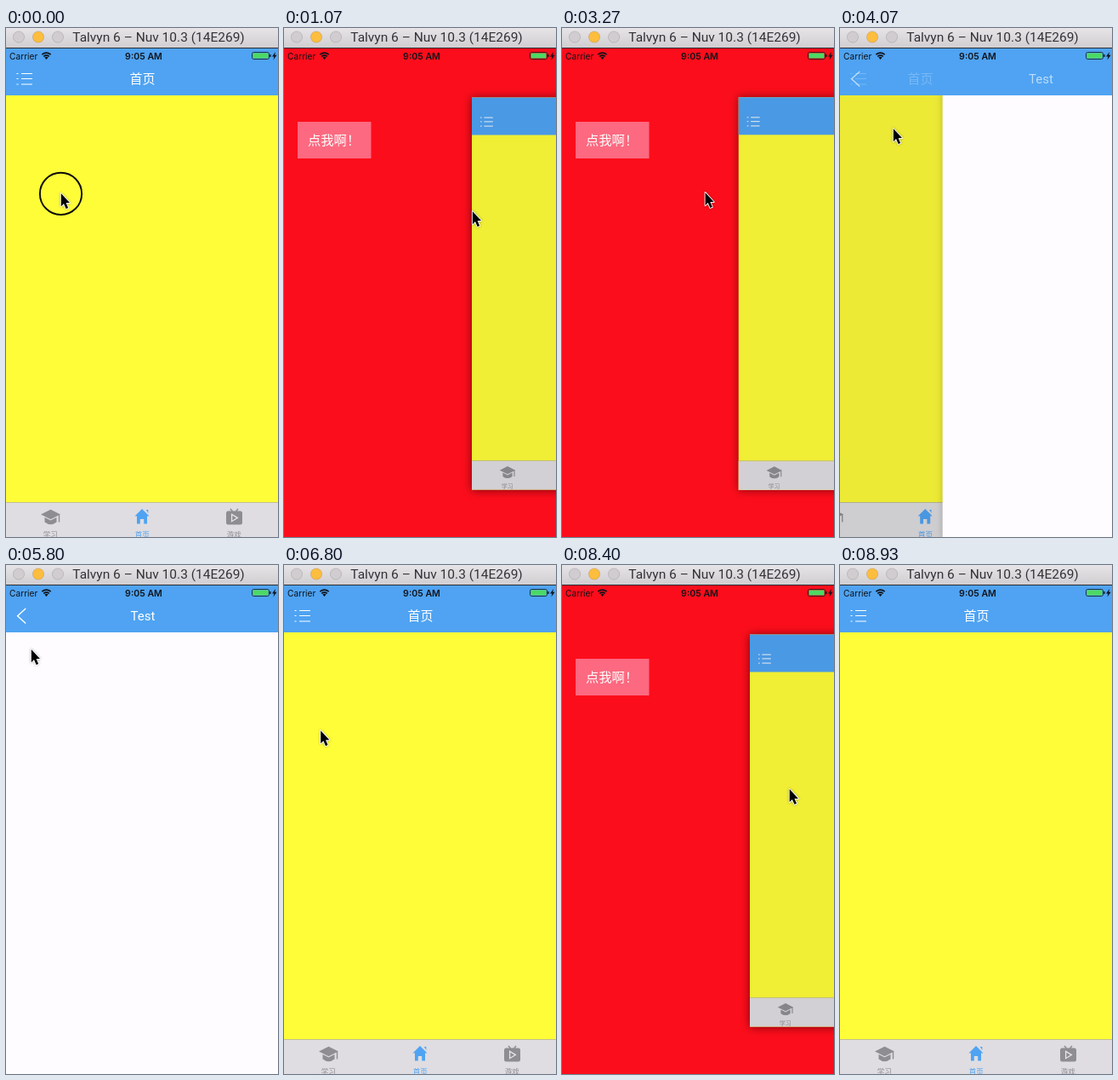
These frames come from a looping animation (320x597 px, 8990 ms). An HTML page with a canvas:

```html
<!DOCTYPE html>
<html lang="zh-CN">
<head>
<meta charset="utf-8">
<title>Side menu demo</title>
<style>
html, body { margin: 0; width: 100%; height: 100%; overflow: hidden; background: #fc0d1b; }
canvas { display: block; width: 320px; height: 597px; }
</style>
</head>
<body>
<canvas id="stage" width="320" height="597"></canvas>
<script>
const ctx = document.getElementById('stage').getContext('2d');
const LOOP = 8990, TOP = 24, NAV = 55, BOTTOM = 599, MIDDLE = (TOP + BOTTOM) / 2;
const OPEN = 221;
const BLUE = '#4fa3f2', GRAY = '#8e8d91';
const CJK = '"Noto Sans CJK SC", "Noto Sans CJK", sans-serif';

const clamp = v => Math.min(1, Math.max(0, v));
const smooth = u => u * u * (3 - 2 * u);
const easeOut = u => 1 - (1 - u) ** 2;
const ramp = (t, start, end, ease = smooth) => ease(clamp((t - start) / (end - start)));

// How far the menu is open (0 to 1): three times out and back.
const openness = t =>
  ramp(t, 100, 950) - ramp(t, 1900, 2460) +
  ramp(t, 2820, 3350) - ramp(t, 3690, 3865) +
  ramp(t, 7230, 8105) - ramp(t, 8480, 8850);

// How far the test page covers the home page (0 to 1).
const pushed = t => ramp(t, 3878, 4378, easeOut) - ramp(t, 6060, 6540, easeOut);

// Pointer stops; the button is down on the way to a held stop.
const stop = (time, x, y, held = false) => ({ time, x, y, held });
const HELD = true;
const stops = [
  stop(0, 64, 193),
  stop(850, 221, 214, HELD),
  stop(1890, 221, 214),
  stop(2260, 89.5, 224, HELD),
  stop(2780, 52, 215),
  stop(3140, 190, 205, HELD),
  stop(3640, 59, 128),
  stop(3740, 59, 128, HELD),
  stop(4070, 62, 117),
  stop(5150, 110, 202),
  stop(5800, 29, 98),
  stop(5980, 18, 61),
  stop(6060, 18, 61, HELD),
  stop(7200, 52, 245),
  stop(7720, 181.5, 251, HELD),
  stop(8450, 268, 262),
  stop(8530, 268, 262, HELD),
  stop(8900, 300, -40)
];

function rect(x, y, w, h, color) {
  ctx.fillStyle = color;
  ctx.fillRect(x, y, w, h);
}

function text(str, x, y, font, color, align = 'center') {
  ctx.font = font;
  ctx.fillStyle = color;
  ctx.textAlign = align;
  ctx.fillText(str, x, y);
}

function fill(path, color) {
  ctx.fillStyle = color;
  ctx.fill(new Path2D(path));
}

function stroke(path, color, width) {
  ctx.strokeStyle = color;
  ctx.lineWidth = width;
  ctx.stroke(new Path2D(path));
}

function roundRect(x, y, w, h, r) {
  ctx.beginPath();
  ctx.roundRect(x, y, w, h, r);
}

function withAlpha(alpha, draw) {
  ctx.save();
  ctx.globalAlpha = alpha;
  draw();
  ctx.restore();
}

function shadowed(blur, alpha, draw) {
  ctx.save();
  ctx.shadowColor = `rgba(0,0,0,${alpha})`;
  ctx.shadowBlur = blur;
  draw();
  ctx.restore();
}

function titleBar() {
  const shade = ctx.createLinearGradient(0, 0, 0, 23);
  shade.addColorStop(0, '#e7e4e8');
  shade.addColorStop(1, '#d1ced2');
  rect(0, 0, 320, 23, shade);
  rect(0, 23, 320, 1, '#2b2d33');
  ['#d0ccd0', '#fdbd3f', '#d0ccd0'].forEach((color, i) => {
    ctx.beginPath();
    ctx.arc(15 + 23 * i, 10.5, 6.6, 0, 7);
    ctx.fillStyle = color;
    ctx.fill();
    ctx.strokeStyle = 'rgba(0,0,0,0.12)';
    ctx.lineWidth = 1;
    ctx.stroke();
  });
  text('Talvyn 6 – Nuv 10.3 (14E269)', 179.5, 16, '15.5px Roboto, sans-serif', '#343236');
}

function statusBar() {
  const ink = '#10131a';
  text('Carrier', 4, 36.5, '10.2px Inter, sans-serif', ink, 'left');
  text('9:05 AM', 162, 36.5, '600 10.6px Inter, sans-serif', ink);
  stroke('M42.3 31.2Q47.5 27 52.7 31.2M44.2 33.4Q47.5 30.8 50.8 33.4', ink, 1.6);
  fill('M45.4 34.6Q47.5 33 49.6 34.6L47.5 37Z', ink);
  roundRect(289.5, 28.5, 20, 8, 2);
  ctx.strokeStyle = ink;
  ctx.lineWidth = 0.8;
  ctx.stroke();
  rect(290.5, 29.5, 18, 6, '#4cd964');
  rect(310.3, 31, 1.3, 3, ink);
  fill('M317 28L313 33.4H315.4L314.4 37.5L318.6 31.8H316.2Z', ink);
}

function menu() {
  rect(0, TOP, 320, 573, '#fc0d1b');
  rect(16, 110, 86.5, 43, '#fc6980');
  text('点我啊！', 28, 136.8, '15.3px ' + CJK, '#fff', 'left');
}

function tabBar() {
  rect(0, 557, 320, 42, '#dfdde1');
  rect(0, 556, 320, 1, '#c3c08c');
  fill('M41 570.5L52.5 564.7L64 570.5L52.5 576.3ZM45.5 574L52.5 577.6L59.5 574V579.5Q52.5 585 45.5 579.5Z', GRAY);
  stroke('M62.5 571V579.5', GRAY, 1.4);
  fill('M160 564L151.5 572.6H154V581.6H157.8V576H162.2V581.6H166V572.6H168.5ZM164.8 565H167.3V569Z', BLUE);
  roundRect(259, 566.5, 19, 16, 2.5);
  ctx.fillStyle = GRAY;
  ctx.fill();
  stroke('M264 564L266.5 567M273 564L270.5 567', GRAY, 1.5);
  stroke('M265.6 570.5V578.7L272.4 574.6Z', '#e6e4e8', 1.3);
  ['学习', '首页', '游戏'].forEach((label, i) =>
    text(label, 52.3 + 108 * i, 596.5, '8.5px ' + CJK, i === 1 ? BLUE : GRAY));
}

function navBar(push) {
  rect(0, TOP, 320, NAV, BLUE);
  withAlpha((1 - push) ** 1.5, () => {
    for (const y of [53.5, 59.5, 66]) stroke(`M12.5 ${y}h2M18 ${y}h13`, '#fff', 1.2);
    text('首页', 160.5 - 106 * push, 64.7, '15px ' + CJK, '#fff');
  });
  withAlpha(push, () => {
    stroke('M23.2 51L13.6 59.7L23.2 68.5', '#fff', 1.4);
    text('Test', 161 + 200 * (1 - push), 65.2, '15px Roboto, sans-serif', '#fff');
  });
}

function panel(open, push) {
  const scale = 1 - 0.2 * Math.sin(Math.PI / 2 * open ** 1.05);
  const cover = color => rect(0, TOP, 320, BOTTOM - TOP, color);
  ctx.save();
  ctx.translate(OPEN * open, MIDDLE);
  ctx.scale(scale, scale);
  ctx.translate(0, -MIDDLE);
  shadowed(10, 0.55 * open ** 2, () => cover('#fffd38'));

  ctx.save();
  ctx.translate(-96 * push, 0);
  tabBar();
  ctx.restore();
  if (push > 0) {
    cover(`rgba(0,0,0,${0.12 * push})`);
    ctx.save();
    ctx.translate(320 * (1 - push), 0);
    shadowed(8, push < 1 ? 0.25 : 0, () => cover('#fefcff'));
    ctx.restore();
  }
  navBar(push);
  cover(`rgba(0,0,0,${0.3 * (1 - scale)})`);
  ctx.restore();
}

function pointer(t) {
  const next = stops.findIndex(s => s.time > t);
  if (next < 0) return;
  const from = stops[next - 1], to = stops[next];
  const u = ramp(t, from.time, to.time);
  ctx.save();
  ctx.translate(from.x + (to.x - from.x) * u, from.y + (to.y - from.y) * u);
  if (to.held) {
    ctx.beginPath();
    ctx.arc(0.5, 1.4, 24.6, 0, 7);
    ctx.strokeStyle = '#0b0b08';
    ctx.lineWidth = 1.9;
    ctx.stroke();
  }
  const arrow = 'M0.8 1V16.2L4 13.1L6.6 19L9.1 17.9L6.6 12.1H11Z';
  ctx.lineJoin = 'round';
  shadowed(3, 0.3, () => stroke(arrow, '#fff', 1.8));
  fill(arrow, '#000');
  ctx.restore();
}

function draw(t) {
  menu();
  panel(openness(t), pushed(t));
  statusBar();
  titleBar();
  pointer(t);
}

const start = performance.now();
function tick() {
  draw((performance.now() - start) % LOOP);
  requestAnimationFrame(tick);
}
tick();
</script>
</body>
</html>
```
